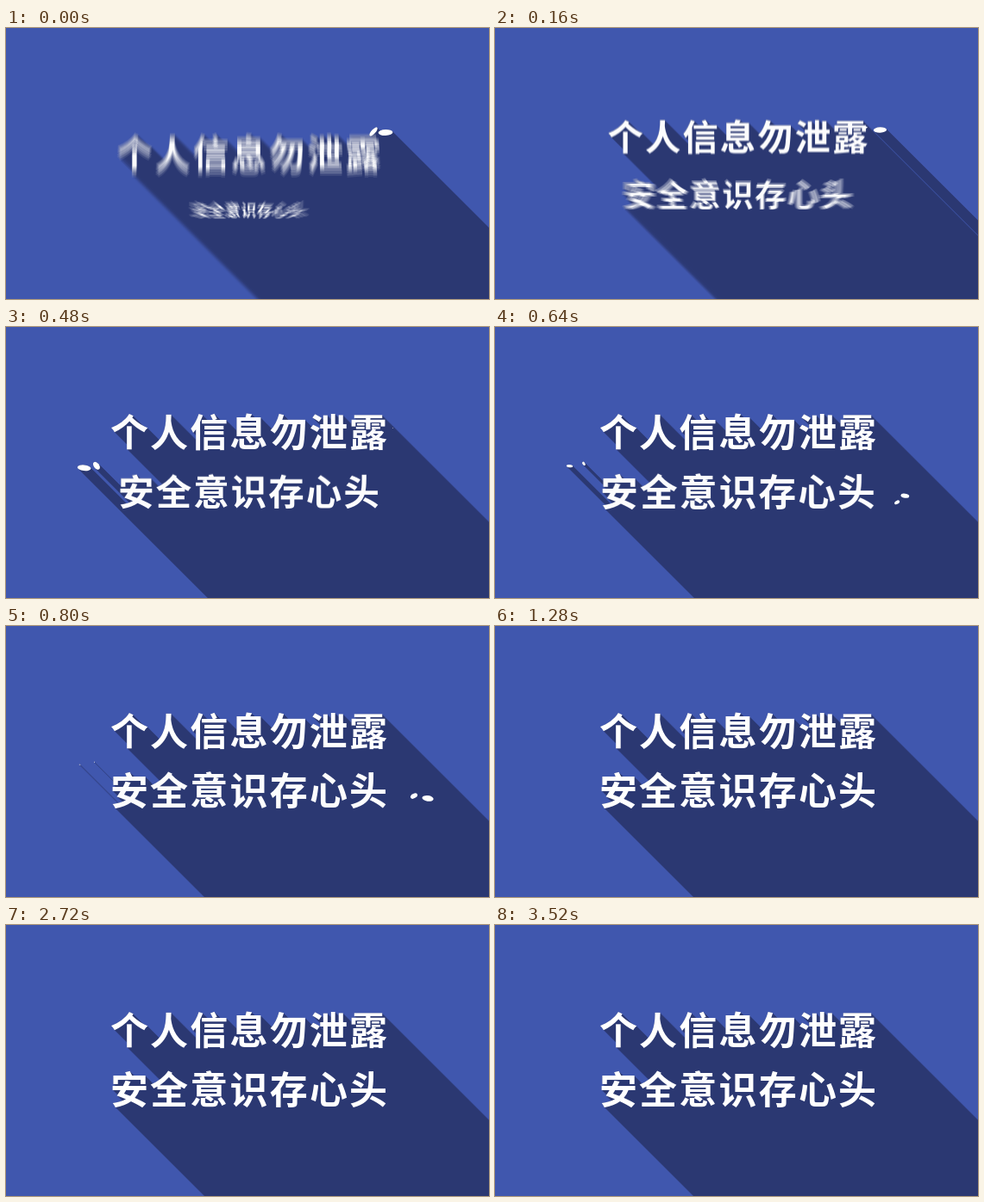
An HTML page with a canvas that plays this animation: 560 px wide and 315 px high, repeating every 3680 ms.

```html
<!DOCTYPE html>
<html lang="zh-CN">
<head>
<meta charset="utf-8">
<title>个人信息勿泄露</title>
<style>
html, body { margin: 0; width: 100%; height: 100%; overflow: hidden; background: #4057ae; }
canvas { display: block; width: 560px; height: 315px; }
</style>
</head>
<body>
<canvas id="stage" width="560" height="315"></canvas>
<script>
const W = 560, H = 315, LOOP = 3680, SHUTTER = 40;
const BG = '#4057ae', SHADE = '#2b3872';
const FONT = '700 44px "Noto Sans CJK SC", "Noto Sans CJK JP", "Noto Sans CJK", sans-serif';
const PITCH = 46.2, CENTER = 281.5;

const makeLayer = () => {
  const c = document.createElement('canvas');
  c.width = W;
  c.height = H;
  return c.getContext('2d');
};
const stage = document.getElementById('stage').getContext('2d');
const shapes = makeLayer();
const shade = makeLayer();
const swap = makeLayer();

// Keys are [time, y, scale]
const title = {
  text: '个人信息勿泄露',
  keys: [[-160, 230, .99], [0, 146.5, .956], [160, 126.5, .94], [320, 122.5, .975], [480, 122.5, 1]]
};
const motto = {
  text: '安全意识存心头',
  keys: [[-160, 232, .1], [0, 212.3, .395], [160, 194, .82], [320, 192, .975], [480, 191.7, .942],
    [640, 191.7, .992], [800, 191.7, 1]]
};

// Splashes fly out from (x, y), slow down at (tx, ty) and dry up there
const DRAG = 115;
const DRY = [[0, 0], [60, .7], [140, 1], [220, .95], [380, .45], [540, .12], [680, 0]];
const splash = (born, x, y, tx, ty, r, flat, deg, spin = 0) => t => {
  const age = t - born;
  if (age <= 0 || age >= 680) return;
  const left = Math.exp(-age / DRAG), size = r * valueAt(DRY, age, 1);
  shapes.beginPath();
  shapes.ellipse(tx + (x - tx) * left, ty + (y - ty) * left, size, size * flat,
    (deg + spin * age) * Math.PI / 180, 0, 2 * Math.PI);
  shapes.fill();
};
const drops = [
  splash(-100, 428, 127, 448.6, 117.5, 9, .42, -2),
  splash(-240, 398, 162.5, 430, 114.5, 7.1, .38, -96, .2),
  splash(260, 122, 179.8, 85.2, 161, 8.3, .43, 6),
  splash(260, 120.3, 180.3, 102.3, 158, 5.4, .6, 52),
  splash(580, 462.6, 192.3, 493.6, 201.8, 7, .5, 8),
  splash(580, 459.7, 209.7, 475.3, 195.5, 4.6, .6, -30)
];

// Smooth curve through the keys, flat at every peak
function slope(keys, i, col) {
  if (i === 0 || i === keys.length - 1) return 0;
  const rate = j => (keys[j + 1][col] - keys[j][col]) / (keys[j + 1][0] - keys[j][0]);
  const a = rate(i - 1), b = rate(i);
  return a * b > 0 ? (a + b) / 2 : 0;
}

function valueAt(keys, t, col) {
  const last = keys.length - 1;
  if (t <= keys[0][0]) return keys[0][col];
  if (t >= keys[last][0]) return keys[last][col];
  let i = 0;
  while (t >= keys[i + 1][0]) i++;
  const a = keys[i], b = keys[i + 1];
  const d = b[0] - a[0], u = (t - a[0]) / d, v = 1 - u;
  return v * v * (1 + 2 * u) * a[col] + u * u * (3 - 2 * u) * b[col]
    + d * u * v * (v * slope(keys, i, col) - u * slope(keys, i + 1, col));
}

function drawLine({ text, keys }, t) {
  const still = t > keys[keys.length - 1][0] + SHUTTER;
  const n = still ? 1 : 12;
  shapes.save();
  shapes.globalCompositeOperation = 'lighter';
  shapes.globalAlpha = 1 / n;
  for (let k = 0; k < n; k++) {
    const at = t + ((k + .5) / n - .5) * SHUTTER;
    const s = valueAt(keys, at, 2);
    shapes.setTransform(s, 0, 0, s, CENTER, valueAt(keys, at, 1));
    [...text].forEach((ch, i) => shapes.fillText(ch, (i - 3) * PITCH, 16.7));
  }
  shapes.restore();
}

// Doubling the offset sweeps the shapes along the diagonal in few passes
function castShadow() {
  shade.globalCompositeOperation = 'copy';
  shade.drawImage(shapes.canvas, 0, 0);
  shade.globalCompositeOperation = 'source-over';
  swap.globalCompositeOperation = 'copy';
  for (let step = 1; step < W; step *= 2) {
    swap.drawImage(shade.canvas, 0, 0);
    shade.drawImage(swap.canvas, step, step);
  }
  shade.globalCompositeOperation = 'source-in';
  shade.fillStyle = SHADE;
  shade.fillRect(0, 0, W, H);
}

function render(t) {
  shapes.clearRect(0, 0, W, H);
  shapes.fillStyle = '#fff';
  shapes.font = FONT;
  shapes.textAlign = 'center';
  drawLine(title, t);
  drawLine(motto, t);
  drops.forEach(draw => draw(t));
  castShadow();
  stage.fillStyle = BG;
  stage.fillRect(0, 0, W, H);
  stage.drawImage(shade.canvas, 0, 0);
  stage.drawImage(shapes.canvas, 0, 0);
}

const start = performance.now();
function tick() {
  render((performance.now() - start) % LOOP);
  requestAnimationFrame(tick);
}
tick();
</script>
</body>
</html>
```
